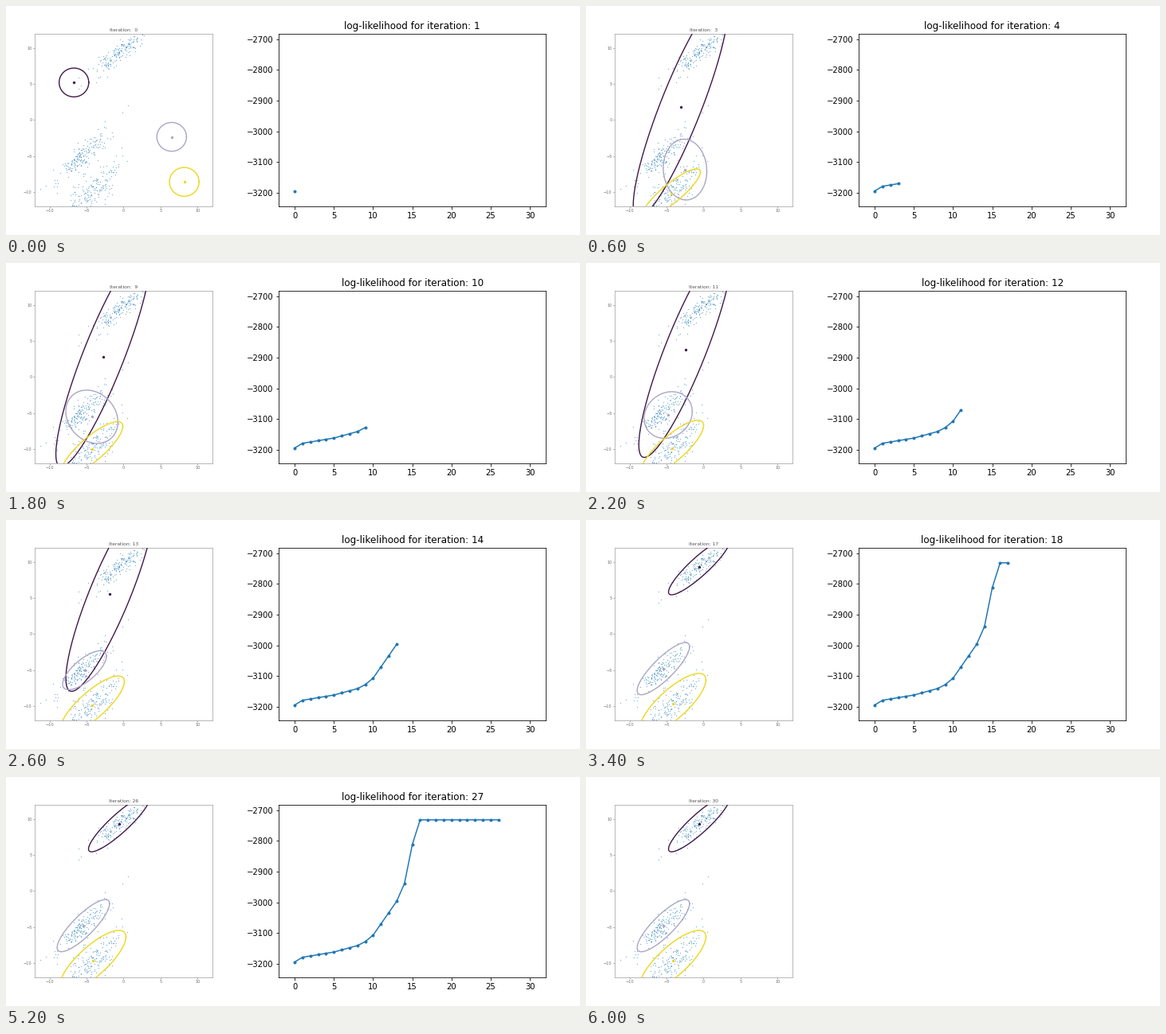
A matplotlib script for the animation above (6200 ms loop, 720 by 288 pixels).

```python
import numpy as np
import matplotlib.pyplot as plt
from matplotlib.animation import FuncAnimation

FRAMES, STEP = 31, 200
COLORS = ["#41194a", "#aca6c6", "#efd61c"]

# Bends of the log-likelihood curve; it is straight between them and flat after
bends = [0, 1, 5, 8, 9, 10, 13, 14, 15, 16]
rises = [0, 15.5, 32.5, 53.5, 66.5, 87.5, 197.5, 255.5, 382.5, 463]
RISE = np.interp(np.arange(FRAMES), bends, rises)
LOGLIK = RISE - 3194.5


def moments(mx, my, sx, sy, r):
    """Mean x, mean y, var x, var y, covariance."""
    return np.array([mx, my, sx**2, sy**2, r * sx * sy])


START = [moments(x, y, 1, 1, 0) for x, y in [(-6.7, 5.2), (6.5, -2.35), (8.2, -8.6)]]
TOP = moments(-.59, 9.35, 2.07, 1.96, .9)
MIDDLE = moments(-5.43, -4.82, 1.77, 1.81, .84)
BOTTOM = moments(-4.14, -9.72, 2.23, 2.12, .79)


def merged(k):
    """Top cluster plus a fading share of the points below it."""
    share = .55 * (1 - RISE[k - 1] / RISE[-1]) ** 1.8
    dx, dy = -4.9, -14.85
    spread = share * (1 - share) * np.array([dx * dx, dy * dy, dx * dy])
    return TOP + np.concatenate([[share * dx, share * dy], spread])


def blend(k, times, states):
    return np.array([np.interp(k, times, c) for c in np.transpose(states)])


def mixture(k):
    if k == 0:
        return START
    gray = blend(k, [3, 9, 13, 17], [moments(-2.5, -6.89, 1.47, 2.11, -.05),
                                     moments(-4.28, -5.53, 1.76, 1.85, -.2),
                                     moments(-5.27, -5.04, 1.48, 1.35, .72), MIDDLE])
    yellow = blend(k, [0, 17], [moments(-4.4, -10.3, 1.9, 1.6, .9), BOTTOM])
    return [merged(k), gray, yellow]


def factor(m):
    return np.linalg.cholesky([[m[2], m[4]], [m[4], m[3]]])


def contour(m):
    t = np.linspace(0, 2 * np.pi, 200)
    return m[:2, None] + 2 * factor(m) @ [np.cos(t), np.sin(t)]


def sample():
    rng = np.random.default_rng(4)
    parts = [m[:2] + .9 * rng.standard_normal((180, 2)) @ factor(m).T
             for m in (TOP, MIDDLE, BOTTOM)]
    strays = [(-11.3, -9.6), (.55, 2), (-.15, 1), (-5.75, 4.8)]
    return np.vstack(parts + [strays]).T


plt.rcParams["font.family"] = "DejaVu Sans"
fig, (left, right) = plt.subplots(
    1, 2, figsize=(10, 4), dpi=72, facecolor="white",
    gridspec_kw=dict(left=.05, right=.94, bottom=.125, top=.88,
                     wspace=.3, width_ratios=[1, 1.5]))

left.set(xlim=(-12, 12), ylim=(-12, 12),
         xticks=range(-10, 11, 5), yticks=range(-10, 11, 5))
left.tick_params(labelsize=5, length=1.7, pad=1.7, width=.5,
                 color="#555555", labelcolor="#707070")
left.spines[:].set(color="#a8a8a8", linewidth=.8)
name = left.set_title("", fontsize=6, pad=2.6, color="#505050")
left.plot(*sample(), "o", color="#1f77b4", ms=1.35, mew=0, alpha=.55)
rings = [left.plot([], [], color=c, lw=1.4, zorder=3)[0] for c in COLORS]
centers = [left.plot([], [], "o", color=c, ms=3.4, mew=0, zorder=4)[0] for c in COLORS]

right.set(xlim=(-2, 32), ylim=(LOGLIK[0] - 50, LOGLIK[-1] + 50),
          xticks=range(0, 31, 5), yticks=range(-3200, -2699, 100))
caption = right.set_title("", fontsize=12)
curve, = right.plot([], [], ".-", color="#1f77b4")


def draw(k):
    name.set_text(f"Iteration: {k:2d}")
    for m, ring, dot in zip(mixture(k), rings, centers):
        ring.set_data(*contour(m))
        dot.set_data([m[0]], [m[1]])
    right.set_visible(k < FRAMES - 1)
    caption.set_text(f"log-likelihood for iteration: {k + 1}")
    curve.set_data(range(k + 1), LOGLIK[:k + 1])
    return []


anim = FuncAnimation(fig, draw, frames=FRAMES, interval=STEP, repeat=True,
                     repeat_delay=0, init_func=lambda: draw(0))
plt.show()
```
